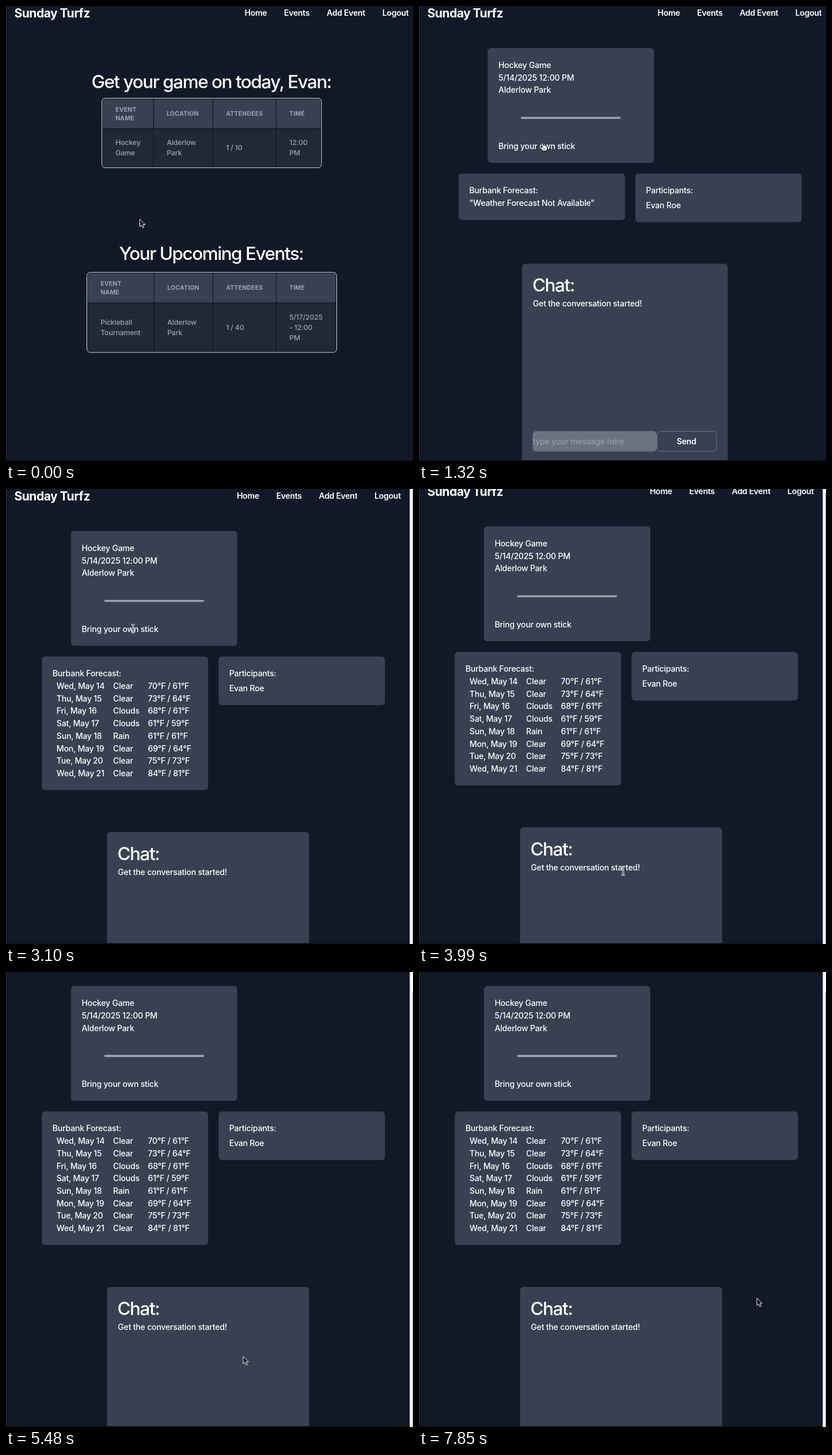
An HTML page for the animation above (8 s loop, 707 by 792 pixels).

```html
<!DOCTYPE html>
<html lang="en">
<head>
<meta charset="utf-8">
<title>Sunday Turfz</title>
<style>
html, body { margin: 0; width: 100%; height: 100%; overflow: hidden; background: #111827; }
svg { display: block; width: 707px; height: 792px; }
text { font: 500 14.05px Inter, Roboto, sans-serif; font-optical-sizing: none; letter-spacing: -.2px; fill: #fff; }
.brand { font-size: 21px; font-weight: 700; letter-spacing: -.5px; }
.nav { font-weight: 600; letter-spacing: -.27px; }
.title { font-size: 31.5px; letter-spacing: -1.5px; }
.head { font-size: 10.5px; font-weight: 700; letter-spacing: .18px; fill: #9ca3af; }
.cell { font-size: 12.3px; letter-spacing: -.15px; fill: #9ca3af; }
.hint { font-weight: 400; letter-spacing: -.1px; fill: #9ca3af; }
</style>
</head>
<body>
<svg id="stage" viewBox="0 0 707 792"></svg>
<script>
const LOOP = 8000, OPEN = 1320, LOADED = 2050;

// time, x, y, cursor shape
const pointer = [
  [0, 232.5, 371, 'arrow'], [140, 226, 428, 'arrow'], [290, 209, 525, 'hand'], [430, 205, 548, 'hand'],
  [580, 211, 470, 'arrow'], [730, 215, 340, 'arrow'], [870, 216, 258, 'hand'], [1020, 214, 238, 'hand'],
  [1470, 214.5, 237, 'beam'], [3100, 220.5, 243, 'beam'], [3250, 235, 305, 'beam'], [3400, 288, 480, 'beam'],
  [3550, 334, 625, 'beam'], [3700, 352, 680, 'beam'], [3850, 354.5, 665, 'beam'], [4580, 359, 669, 'beam'],
  [4730, 361.5, 671, 'beam'], [5330, 372, 671, 'beam'], [5480, 412, 669, 'arrow'], [5620, 475, 666, 'arrow'],
  [5770, 550, 662, 'arrow'], [5920, 620, 658, 'arrow'], [6060, 668, 655, 'arrow'], [6210, 692, 653, 'arrow'],
  [6350, 700, 652, 'arrow'], [6500, 701.5, 651, 'arrow'], [6650, 703, 650.5, 'arrow'], [6800, 705.5, 650, 'arrow'],
  [6950, 720, 650, 'arrow'], [7400, 690, 683, 'arrow'], [7550, 600, 612, 'arrow'], [7700, 554, 576, 'arrow'],
  [7850, 587, 567.5, 'arrow']
];
const scroll = [[0, 0], [3850, 8], [4000, 22], [4140, 39], [4280, 48.7]];

const shapes = {
  arrow: '<path d="M0 0V13L3 10.3 5 15 7.2 14 5.2 9.5H9.2Z" fill="#000" stroke="#fff"/>',
  hand: '<path d="M-1 1Q.2-.8 1.4 1L2.2 5Q3.6 3.8 4.4 5.2 6 4.3 6.5 5.9 8.4 5.2 8.5 7.2V10Q8.3 12 7.2 14H.8Q-.8 11.2-3.2 9-3.8 7.2-2 7.2L.2 8.6Z" fill="#fff" stroke="#000" stroke-width=".8"/><path d="M3 9.5V12M5 9.5V12" stroke="#000" stroke-width=".7"/>',
  beam: ['#fff" stroke-width="2.6', '#1f2937" stroke-width=".9'].map(s =>
    `<path d="M-3-7Q0-7 0-4.5 0-7 3-7M0-4.5V4.5M-3 7Q0 7 0 4.5 0 7 3 7M-2 2H2" fill="none" stroke="${s}"/>`).join('')
};

const held = (keys, t) => keys.findLast(k => k[0] <= t);
const rect = (x, y, w, h, fill, r = 0, extra = '') =>
  `<rect x="${x}" y="${y}" width="${w}" height="${h}" rx="${r}" fill="${fill}" ${extra}/>`;
const text = (x, y, s, cls = '') => `<text x="${x}" y="${y}" class="${cls}">${s}</text>`;
const card = (x, y, w, h) => rect(x, y, w, h, '#374151', 6);
const move = (x, y, body) => `<g transform="translate(${x} ${y})">${body}</g>`;
// text lines centred on y
const lines = (x, y, list, gap, cls) =>
  list.map((s, i) => text(x, y + (i - (list.length - 1) / 2) * gap, s, cls)).join('');

const header = shift => text(14.5, 20, 'Sunday Turfz', 'brand') +
  [['Home', 414.5], ['Events', 483], ['Add Event', 557], ['Logout', 653.7]]
    .map(([s, x]) => text(x - shift, 17, s, 'nav')).join('');

function table(left, right, top, rowH, cells, hot) {
  const cols = [left + 2, left === 140 ? 258 : 257, 360, 470, right - .5];
  const heads = [['EVENT', 'NAME'], ['LOCATION'], ['ATTENDEES'], ['TIME']];
  let out = rect(left + .5, top + .5, right - left - .5, 55.5 + rowH, 'none', 6, 'stroke="#d6d9de"');
  heads.forEach((head, i) => {
    const x = cols[i], w = cols[i + 1] - x - 1.2, tx = x + 22.2;
    out += rect(x, top + 2, w, 51, '#374151', i % 3 ? 0 : 3) +
      rect(x, top + 54.5, w, rowH, hot ? '#4b5563' : '#1f2937', i % 3 ? 0 : 3) +
      lines(tx, top + 31.3, head, 14.5, 'head') +
      lines(tx, top + 54.5 + rowH / 2 + 4.2, cells[i], 18, 'cell');
  });
  return out;
}

function home(y) {
  return header(0) +
    text(148.5, 143, 'Get your game on today, Evan:', 'title') +
    table(166, 548, 160, 65.5, [['Hockey', 'Game'], ['Alderlow', 'Park'], ['1 / 10'], ['12:00', 'PM']], y > 214 && y < 280) +
    text(196.5, 442, 'Your Upcoming Events:', 'title') +
    table(140, 574.5, 463, 84, [['Pickleball', 'Tournament'], ['Alderlow', 'Park'], ['1 / 40'], ['5/17/2025', '- 12:00', 'PM']], y > 517 && y < 601);
}

const days = ['Wed', 'Thu', 'Fri', 'Sat', 'Sun', 'Mon', 'Tue', 'Wed'];
const skies = ['Clear', 'Clear', 'Clouds', 'Clouds', 'Rain', 'Clear', 'Clear', 'Clear'];
const temps = ['70/61', '73/64', '68/61', '61/59', '61/61', '69/64', '75/73', '84/81'];
const forecast = days.map((d, i) => {
  const y = 348 + i * 21.7, [hi, lo] = temps[i].split('/');
  return text(94.3, y, `${d}, May ${14 + i}`) + text(192.6, y, skies[i]) + text(253, y, `${hi}°F / ${lo}°F`);
}).join('');

function detail(loaded) {
  const cards = card(119.3, 73, 289, 200) +
    text(138, 108, 'Hockey Game') + text(138, 129.7, '5/14/2025 12:00 PM') + text(138, 151.4, 'Alderlow Park') +
    rect(177, 193, 173.5, 3.6, '#9ca3af', 1.8) + text(138, 249, 'Bring your own stick') +
    card(68.7, 291.5, 289, loaded ? 232.5 : 81) + text(87.3, 326, 'Burbank Forecast:') +
    (loaded ? forecast : text(87.3, 348, '"Weather Forecast Not Available"')) +
    card(375.7, 291.5, 289, 84.7) + text(394.2, 326, 'Participants:') + text(394.2, 351.5, 'Evan Roe');
  const chat = card(179, 448.5, loaded ? 351 : 357.3, 420) +
    text(197, 497, 'Chat:', 'title') + text(197.8, 523, 'Get the conversation started!') +
    rect(197.5, 740, 215.5, 35.5, '#6b7280', 6) + text(197.5, 763, 'type your message here', 'hint') +
    rect(413.5, 740.5, 103.5, 34.7, 'none', 6, 'stroke="#6b7280"') + text(447.7, 763, 'Send', 'nav');
  return header(loaded ? 13.6 : 0) + move(loaded ? -6.5 : 0, 0, cards) + (loaded ? move(-3.5, 148.5, chat) : chat);
}

function scrollbar(top, hot) {
  return rect(701.5, 0, 5.5, 792, '#fafafa') + rect(701.5, 0, 1, 792, '#d9d9dc') +
    rect(hot ? 705 : 705.5, 2 + top * .62, 10, 900, hot ? '#7d7d7d' : '#b9b9b9', 4);
}

function picture(t) {
  const [, x, y, shape] = held(pointer, t), top = held(scroll, t)[1], loaded = t >= LOADED;
  return rect(0, 0, 707, 792, '#111827') +
    (t < OPEN ? home(y) : move(0, -top, detail(loaded))) +
    rect(0, 0, 1, 792, '#2b3240') + rect(0, 790.5, 707, 1.5, '#0b101c') +
    (loaded ? scrollbar(top, t >= 6350 && t < 6950) : '') +
    move(x, y, shapes[shape]);
}

const stage = document.getElementById('stage');
let shown = '';
function frame() {
  const next = picture(performance.now() % LOOP);
  if (next !== shown) stage.innerHTML = shown = next;
  requestAnimationFrame(frame);
}
frame();
</script>
</body>
</html>
```
